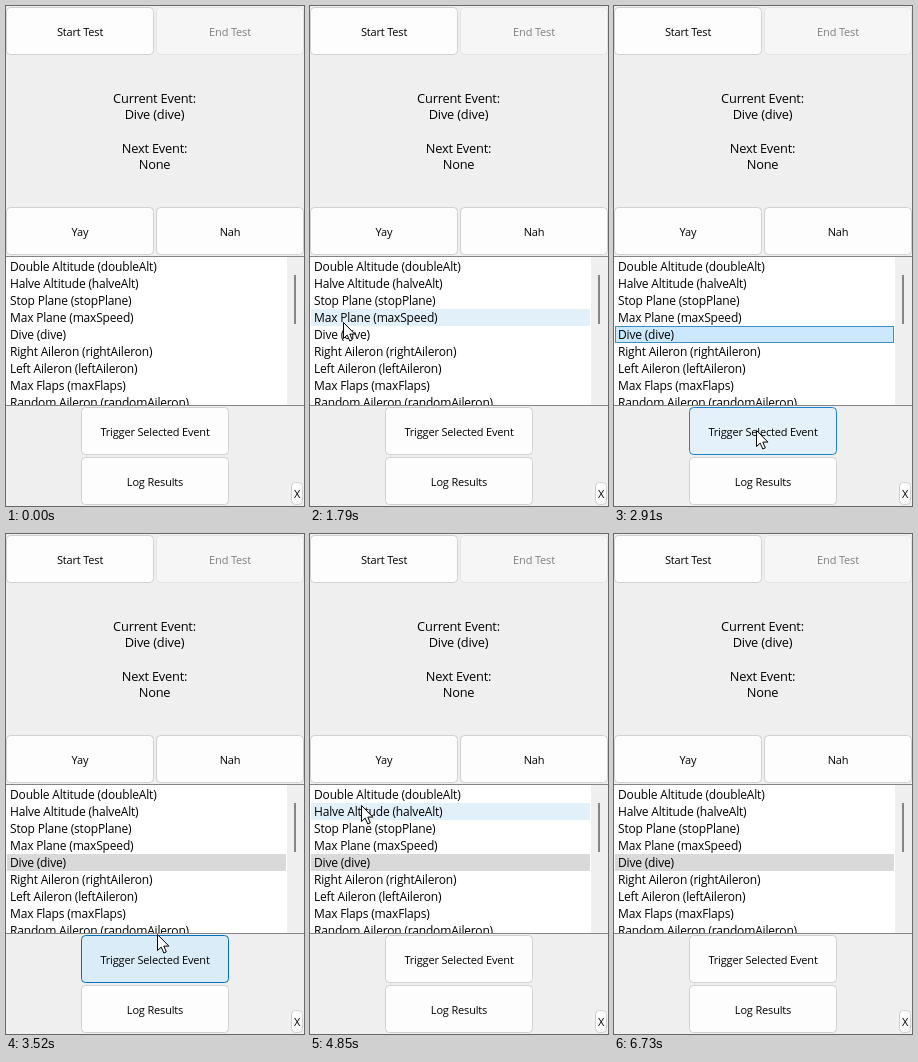
Animation of 298 by 500 pixels, one loop 6910 ms. Source, as an HTML page with a canvas:

```html
<!DOCTYPE html>
<html lang="en">
<head>
<meta charset="utf-8">
<title>Event panel</title>
<style>
html, body { margin: 0; width: 100%; height: 100%; overflow: hidden; background: #efefef; }
canvas { display: block; }
</style>
</head>
<body>
<canvas id="stage" width="298" height="500"></canvas>
<script>
const canvas = document.getElementById('stage');
const ctx = canvas.getContext('2d');
const WIDTH = canvas.width, HEIGHT = canvas.height, LOOP = 6910;
const FONT = '"Open Sans", "Noto Sans", sans-serif';
const BUTTON_W = 148, BUTTON_H = 48, RIGHT = 150, MIDDLE = 75;
const LIST_TOP = 250, LIST_BOTTOM = 399, ROW_TOP = 252, ROW_H = 17, ROW_END = 280;
const SELECTED = 4, SELECT_AT = 2240, BLUR_AT = 3150;

const events = [
  'Double Altitude (doubleAlt)', 'Halve Altitude (halveAlt)', 'Stop Plane (stopPlane)',
  'Max Plane (maxSpeed)', 'Dive (dive)', 'Right Aileron (rightAileron)',
  'Left Aileron (leftAileron)', 'Max Flaps (maxFlaps)', 'Random Aileron (randomAileron)'
];
const status = ['Current Event:', 'Dive (dive)', '', 'Next Event:', 'None'];

const enter = 1480, leave = 5640;
const stops = [
  { t: enter, x: 3, y: 268 },
  { t: 1790, x: 33, y: 316 },
  { t: 2450, x: 86, y: 340 },
  { t: 2880, x: 142, y: 424, rest: 500 },
  { t: 3520, x: 151, y: 401 },
  { t: 3860, x: 105, y: 226 },
  { t: 4090, x: 106, y: 251 },
  { t: 4320, x: 72, y: 271, rest: 350 },
  { t: 4850, x: 51, y: 271 },
  { t: 5180, x: 34, y: 262, rest: 210 },
  { t: leave, x: -14, y: 262 }
];

const clamp = v => Math.max(0, Math.min(1, v));
const lerp = (a, b, k) => a + (b - a) * k;
const mix = (a, b, k) => a.map((v, i) => Math.round(lerp(v, b[i], k)));
const grey = v => [v, v, v];
const rgb = c => `rgb(${c})`;

function pointerAt(t) {
  if (t < enter || t >= leave) return null;
  const i = stops.findIndex(stop => stop.t > t);
  const from = stops[i - 1], to = stops[i];
  const start = from.t + (from.rest || 0);
  const k = clamp((t - start) / (to.t - start));
  return { x: Math.round(lerp(from.x, to.x, k)), y: Math.round(lerp(from.y, to.y, k)) };
}

// Fades in from start and out after end
function pulse(t, start, end, rise, fall) {
  return t < end ? clamp((t - start) / rise) : 1 - clamp((t - end) / fall);
}
const hoverPulse = (t, start, end) => pulse(t, start, end, 150, 300);
const pressPulse = (t, start, end) => pulse(t, start, end, 60, 200);

function text(str, x, y, size, color = '#000', align = 'center') {
  ctx.font = `${size}px ${FONT}`;
  ctx.letterSpacing = `${-0.015 * size}px`;
  ctx.textAlign = align;
  ctx.fillStyle = color;
  ctx.fillText(str, x, Math.round(y));
}

function button(label, x, y, { w = BUTTON_W, h = BUTTON_H, hover = 0, press = 0, disabled } = {}) {
  const fill = mix(grey(disabled ? 246 : 253), [224, 239, 250], hover);
  const edge = mix(grey(disabled ? 228 : 208), [0, 120, 200], hover);
  ctx.beginPath();
  ctx.roundRect(x + 0.5, y + 0.5, w - 1, h - 1, 4);
  ctx.fillStyle = rgb(mix(fill, [204, 228, 247], press));
  ctx.fill();
  ctx.strokeStyle = rgb(mix(edge, [0, 84, 153], press));
  ctx.lineWidth = 1;
  ctx.stroke();
  text(label, x + w / 2, y + h / 2 + 4.5, 11, disabled ? '#808080' : '#000');
}

function row(label, i, t, hovered) {
  const y = ROW_TOP + i * ROW_H;
  const selected = i === SELECTED && t >= SELECT_AT;
  const focused = selected && t < BLUR_AT;
  if (selected || hovered) {
    ctx.fillStyle = focused ? '#cce8ff' : selected ? '#d9d9d9' : '#e2f0fa';
    ctx.fillRect(1, y, ROW_END - 1, ROW_H);
  }
  if (focused) {
    ctx.strokeStyle = '#3a8fc4';
    ctx.lineWidth = 1;
    ctx.strokeRect(1.5, y + 0.5, ROW_END - 2, ROW_H - 1);
  }
  text(label, 4, y + 13, 12, '#000', 'left');
}

function list(t, pointer) {
  const over = pointer && pointer.x >= 0 && pointer.y < LIST_BOTTOM;
  const hovered = over ? Math.floor((pointer.y - ROW_TOP) / ROW_H) : -1;
  ctx.save();
  ctx.beginPath();
  ctx.rect(0, LIST_TOP, WIDTH, LIST_BOTTOM - LIST_TOP);
  ctx.clip();
  ctx.fillStyle = '#fff';
  ctx.fillRect(0, LIST_TOP, ROW_END + 1, LIST_BOTTOM - LIST_TOP);
  events.forEach((label, i) => row(label, i, t, i === hovered));
  ctx.restore();

  ctx.fillStyle = '#858585';
  ctx.fillRect(0, LIST_TOP, WIDTH, 1);
  ctx.fillRect(0, LIST_BOTTOM, WIDTH, 1);
  ctx.fillRect(288, 269, 2, 49);
}

function cursor({ x, y }) {
  ctx.save();
  ctx.translate(x + 0.5, y + 0.5);
  const arrow = new Path2D('M0 0V16L3.7 12.6 6.3 18.5 8.8 17.4 6.3 11.6H11.4Z');
  ctx.fillStyle = '#fff';
  ctx.fill(arrow);
  ctx.strokeStyle = '#000';
  ctx.lineWidth = 1;
  ctx.stroke(arrow);
  ctx.restore();
}

function draw(t) {
  const pointer = pointerAt(t);
  ctx.fillStyle = '#efefef';
  ctx.fillRect(0, 0, WIDTH, HEIGHT);

  button('Start Test', 0, 1);
  button('End Test', RIGHT, 1, { disabled: true });
  status.forEach((line, i) => text(line, WIDTH / 2 - 0.5, 96.7 + 16.6 * i, 12.8));
  button('Yay', 0, 201, {
    hover: hoverPulse(t, 3810, 3980), press: pressPulse(t, 3860, 3900)
  });
  button('Nah', RIGHT, 201);
  list(t, pointer);
  button('Trigger Selected Event', MIDDLE, 401, {
    hover: hoverPulse(t, 2780, 3525), press: pressPulse(t, BLUR_AT, 3370)
  });
  button('Log Results', MIDDLE, 451);
  button('X', 285, 476, { w: 12, h: 23 });
  if (pointer) cursor(pointer);
}

const begin = performance.now();
function tick() {
  draw((performance.now() - begin) % LOOP);
  requestAnimationFrame(tick);
}
tick();
</script>
</body>
</html>
```
